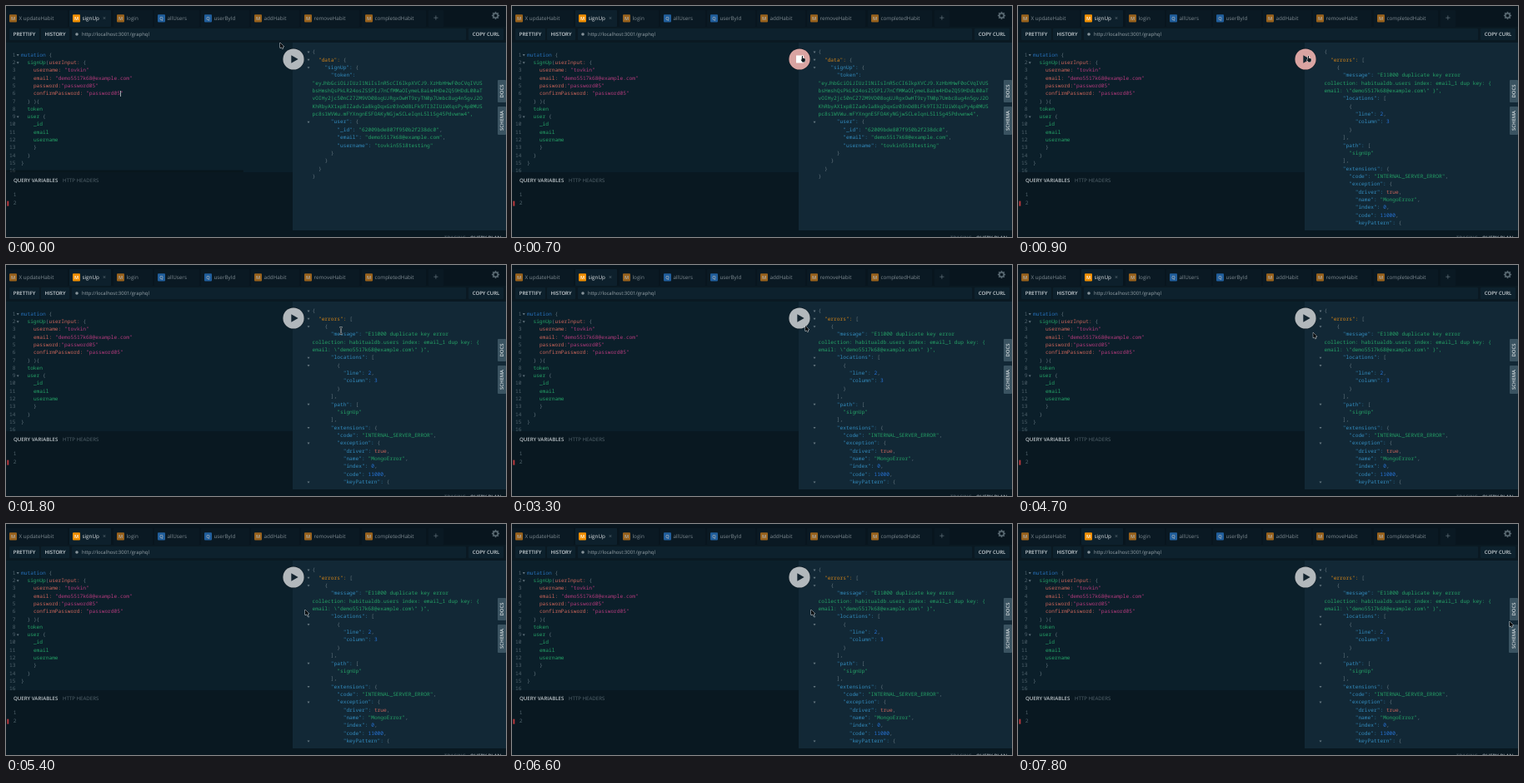
An HTML page with a canvas for the animation above (8.1 s loop, 600x278 px).

```html
<!DOCTYPE html>
<html lang="en">
<head>
<meta charset="utf-8">
<title>GraphQL playground</title>
<style>
  html, body { margin: 0; width: 100%; height: 100%; overflow: hidden; background: #09161f; }
  canvas { display: block; width: 600px; height: 278px; }
</style>
</head>
<body>
<canvas id="stage" width="600" height="278"></canvas>
<script>
const ctx = document.getElementById('stage').getContext('2d');
const LOOP = 8100;
const CHAR = 3.72, ROW = 9.36;
const MONO = `${CHAR / 0.6}px "Noto Sans Mono", monospace`;
const sans = (size, weight = 400) => `${weight} ${size}px "Open Sans", sans-serif`;

const COLOR = {
  green: '#25a166', blue: '#266fb9', key: '#338bbd', pink: '#b33a7c',
  attr: '#c9645a', orange: '#cd8119', punct: '#63747e', gutter: '#50626c'
};

const EMAIL = 'demo5517k68@example.com';

const query = [
  'mutation {',
  '  signUp(userInput: {',
  '    username: "tovkin"',
  `    email: "${EMAIL}"`,
  '    password:"password05"',
  '    confirmPassword: "password05"',
  '  } ){',
  '  token',
  '  user {',
  '    _id',
  '    email',
  '    username',
  '    }',
  '  }',
  '}',
  ''
];

let seed = 17;
function randomText(length) {
  const letters = 'ABCDEFGHIJKLMNOPQRSTUVWXYZabcdefghijklmnopqrstuvwxyz0123456789';
  let out = '';
  while (out.length < length) {
    seed = (seed * 16807) % 2147483647;
    out += letters[seed % letters.length];
  }
  return out;
}

// A leading "~" marks a row that continues a wrapped string.
const success = [
  '{',
  '  "data": {',
  '    "signUp": {',
  '      "token":',
  '~"eyJhbGciOiJIUzI1NiIsInR5cCI6IkpXVCJ9.' + randomText(17),
  '~' + randomText(55),
  '~' + randomText(55),
  '~' + randomText(55),
  '~' + randomText(9) + '.' + randomText(40) + '",',
  '      "user": {',
  '        "_id": "62009bde807f950b2f238dc0",',
  `        "email": "${EMAIL}",`,
  '        "username": "tovkin5518testing"',
  '      }',
  '    }',
  '  }',
  '}'
];

const failure = [
  '{',
  '  "errors": [',
  '    {',
  '      "message": "E11000 duplicate key error',
  '~collection: habitualdb.users index: email_1 dup key: {',
  `~email: \\"${EMAIL}\\" }",`,
  '      "locations": [',
  '        {',
  '          "line": 2,',
  '          "column": 3',
  '        }',
  '      ],',
  '      "path": [',
  '        "signUp"',
  '      ],',
  '      "extensions": {',
  '        "code": "INTERNAL_SERVER_ERROR",',
  '        "exception": {',
  '          "driver": true,',
  '          "name": "MongoError",',
  '          "index": 0,',
  '          "code": 11000,',
  '          "keyPattern": {'
];

const tabs = [
  [0, 74, 'M', 'X updateHabit'], [76, 50, 'M', 'signUp'], [129, 47, 'M', 'login'],
  [178, 54, 'Q', 'allUsers'], [234, 58, 'Q', 'userById'], [294, 58, 'M', 'addHabit'],
  [354, 70, 'M', 'removeHabit'], [427, 77, 'M', 'completedHabit']
];

// time, x, y of the pointer tip
const pointerPath = [
  [0, 329, 44], [200, 329, 44], [600, 348, 60], [1200, 348, 60], [1700, 402, 79],
  [2100, 402, 79], [2700, 364, 88], [3100, 360, 86], [3300, 352, 73], [3500, 352, 73],
  [4000, 354, 80], [4600, 354, 80], [5300, 359, 103], [7000, 359, 103],
  [7700, 590, 117], [LOOP, 590, 117]
];

const clamp = v => Math.max(0, Math.min(1, v));
const ramp = (t, a, b) => clamp((t - a) / (b - a));
const pulse = (t, a, b, c, d) => ramp(t, a, b) * (1 - ramp(t, c, d));

function box(x, y, w, h, fill, radius = 0) {
  ctx.fillStyle = fill;
  ctx.beginPath();
  ctx.roundRect(x, y, w, h, radius);
  ctx.fill();
}

function disc(x, y, r, fill) {
  ctx.beginPath();
  ctx.arc(x, y, r, 0, Math.PI * 2);
  ctx.fillStyle = fill;
  ctx.fill();
}

function text(str, x, y, font, fill, align = 'left') {
  ctx.font = font;
  ctx.fillStyle = fill;
  ctx.textAlign = align;
  ctx.fillText(str, x, y);
}

function polygon(points, fill, stroke) {
  ctx.beginPath();
  points.forEach(([x, y]) => ctx.lineTo(x, y));
  ctx.closePath();
  if (stroke) {
    ctx.strokeStyle = stroke;
    ctx.lineWidth = 1;
    ctx.stroke();
  }
  ctx.fillStyle = fill;
  ctx.fill();
}

function foldArrow(x, y) {
  polygon([[x - 1.5, y - 1], [x + 1.5, y - 1], [x, y + 1.4]], '#63757f');
}

function queryColor(token) {
  if (token[0] === '"') return COLOR.pink;
  if (token === 'mutation') return COLOR.blue;
  if (token.endsWith(':')) return COLOR.attr;
  return /\w/.test(token) ? COLOR.green : COLOR.punct;
}

function resultColor(token, column) {
  if (/":$/.test(token)) return column === 2 ? COLOR.orange : COLOR.key;
  if (token[0] === '"') return COLOR.green;
  if (/^\d/.test(token)) return '#2673d6';
  return token === 'true' ? COLOR.attr : COLOR.punct;
}

function codeLine(line, x, y, pattern, colorOf) {
  if (line[0] === '~') return text(line.slice(1), x, y, MONO, COLOR.green);
  for (const match of line.matchAll(pattern)) {
    text(match[0], x + match.index * CHAR, y, MONO, colorOf(match[0], match.index));
  }
}

function drawGear(x, y) {
  ctx.strokeStyle = '#56666f';
  ctx.lineWidth = 1.7;
  ctx.beginPath();
  ctx.arc(x, y, 2.7, 0, Math.PI * 2);
  ctx.stroke();
  for (let i = 0; i < 8; i++) {
    const a = i * Math.PI / 4;
    ctx.beginPath();
    ctx.moveTo(x + Math.cos(a) * 3, y + Math.sin(a) * 3);
    ctx.lineTo(x + Math.cos(a) * 4.6, y + Math.sin(a) * 4.6);
    ctx.stroke();
  }
}

function drawTabs() {
  box(0, 0, 600, 25, '#08151e');
  tabs.forEach(([x, w, kind, label], i) => {
    const active = i === 1;
    const fill = kind === 'M' ? (active ? '#f18f01' : '#99621c') : '#215f9d';
    box(x, 5, w, 20, active ? '#0d202c' : '#0a1923', 1);
    box(x + 4, 10.3, 9, 9.2, fill, 1);
    text(kind, x + 8.5, 15.2, sans(5.6, 600), active ? '#fff' : '#aeb2b3', 'center');
    text(label, x + 15.5, 15, sans(6.3), active ? '#dfe4e6' : '#7f8b92');
  });
  text('×', 118, 15, sans(7), '#5d6c75', 'center');
  box(507, 5, 18, 20, '#0a1923', 1);
  text('+', 516, 15, sans(11), '#5f6f78', 'center');
  drawGear(587.5, 11.5);
}

function drawToolbar() {
  box(0, 25, 600, 19, '#0a1922');
  [[4, 36, 'PRETTIFY'], [42, 34, 'HISTORY'], [555, 42, 'COPY CURL']].forEach(([x, w, label]) => {
    box(x, 27, w, 14, '#0d212d', 1);
    text(label, x + w / 2, 34, sans(6, 600), '#ccd3d7', 'center');
  });
  box(79, 27, 473, 14, '#0d212d', 1);
  disc(85, 34, 1.8, '#87949b');
  text('http://localhost:3001/graphql', 91, 34, sans(5.95), '#98a4aa');
}

function drawEditor(t) {
  box(0, 44, 344, 156, '#0b1f2a');
  ctx.save();
  ctx.beginPath();
  ctx.rect(0, 44, 344, 156);
  ctx.clip();
  query.forEach((line, i) => {
    const y = 59 + i * 9.3;
    text(i + 1, 11.5, y, MONO, COLOR.gutter, 'right');
    if (i === 0 || i === 1 || i === 8) foldArrow(14.2, y);
    codeLine(line, 18, y, /"[^"]*"|\w+:?|[^\s\w"]/g, queryColor);
  });
  if (t < 500) {
    box(137, 102, 0.8, 7, '#c3cbd0');
    box(0, 197.5, 285, 2.5, 'rgba(0, 0, 0, 0.3)', 1);
  }
  ctx.restore();

  box(0, 200, 344, 78, '#091821');
  text('QUERY VARIABLES', 9, 210, sans(6.1, 600), '#bcc4c8');
  text('HTTP HEADERS', 68, 210, sans(6.1), '#56666f');
  text('1', 12.5, 227.5, MONO, COLOR.gutter, 'right');
  text('2', 12.5, 237, MONO, COLOR.gutter, 'right');
  box(1.3, 234.7, 2, 6, '#b9383c');
}

function drawResult(lines, folds) {
  box(344, 44, 256, 226, '#122836');
  lines.forEach((line, i) => {
    const y = 55.5 + i * ROW;
    if (folds && line[0] !== '~' && /[{[]$/.test(line)) foldArrow(363, y);
    codeLine(line, 367.5, y, /"[^"]*":|"[^"]*"?|\w+|[^\s\w"]+/g, resultColor);
  });
  box(344, 270, 256, 8, '#091821');
  text('TRACING', 526, 279, sans(6, 600), '#4b5a64');
  text('QUERY PLAN', 557, 279, sans(6, 600), '#a3adb3');
}

function drawSideTab(label, y, h, x) {
  box(x, y, 600 - x, h, '#3a5361', 1);
  ctx.save();
  ctx.translate(595.2, y + h / 2);
  ctx.rotate(-Math.PI / 2);
  text(label, 0, 0, sans(5.9, 600), '#d3dadd', 'center');
  ctx.restore();
}

function drawPlayButton(t) {
  const heat = Math.max(pulse(t, 400, 700, 900, 1200), pulse(t, 3500, 3800, 4300, 4600));
  const loading = (t >= 500 && t < 800) || (t >= 3700 && t < 4400);
  const mix = (a, b) => Math.round(a + (b - a) * heat);
  disc(345, 64, 13.2, '#0c1a23');
  disc(345, 64, 12.6, `rgb(${mix(178, 218)}, ${mix(184, 164)}, ${mix(188, 162)})`);
  if (loading) box(341, 59.5, 9, 9, '#fff');
  else polygon([[342.3, 59.2], [350.6, 64], [342.3, 68.8]], '#142530');
}

function pointerAt(t) {
  const i = pointerPath.findIndex(p => p[0] > t);
  const [t0, x0, y0] = pointerPath[i - 1];
  const [t1, x1, y1] = pointerPath[i];
  const u = (t - t0) / (t1 - t0);
  const e = u * u * (3 - 2 * u);
  return [x0 + (x1 - x0) * e, y0 + (y1 - y0) * e];
}

function drawHand() {
  polygon([[0, 0], [0.9, 0], [1.1, 2.8], [3.9, 3.6], [3.7, 6], [3.1, 7.5], [0.4, 7.5], [-1.4, 4.8], [-0.4, 4.4]],
    '#10171c', '#f0f2f3');
}

function drawBeam() {
  for (const [color, width] of [['#c2cbd0', 1.8], ['#0a1016', 0.9]]) {
    ctx.strokeStyle = color;
    ctx.lineWidth = width;
    ctx.beginPath();
    ctx.moveTo(-1.7, -3.8); ctx.lineTo(1.7, -3.8);
    ctx.moveTo(0, -3.8); ctx.lineTo(0, 3.8);
    ctx.moveTo(-1.7, 3.8); ctx.lineTo(1.7, 3.8);
    ctx.stroke();
  }
}

function drawArrow() {
  polygon([[0, 0], [0, 6.6], [1.5, 5.3], [2.5, 7.6], [3.6, 7.1], [2.6, 4.9], [4.7, 4.8]],
    '#05090c', '#d5dbdf');
}

function drawPointer(t) {
  const [x, y] = pointerAt(t);
  ctx.save();
  ctx.translate(x, y);
  if (t >= 500 && t < 1300) drawHand();
  else if (x > 375 && x < 585) drawBeam();
  else drawArrow();
  ctx.restore();
}

function draw(now) {
  const t = Math.floor((now % LOOP) / 100) * 100;
  const answered = t >= 800;
  ctx.textBaseline = 'middle';
  ctx.textRendering = 'geometricPrecision';
  box(0, 0, 600, 278, '#09161f');
  drawTabs();
  drawToolbar();
  drawEditor(t);
  // Fold markers appear a moment after a new response.
  drawResult(answered ? failure : success, !answered || t >= 1300);
  drawSideTab('DOCS', 89, 27, 590);
  drawSideTab('SCHEMA', 121, 34, t >= 7700 ? 589 : 590);
  drawPlayButton(t);
  drawPointer(t);
}

const start = performance.now();
function tick() {
  draw(performance.now() - start);
  requestAnimationFrame(tick);
}
tick();
</script>
</body>
</html>
```
